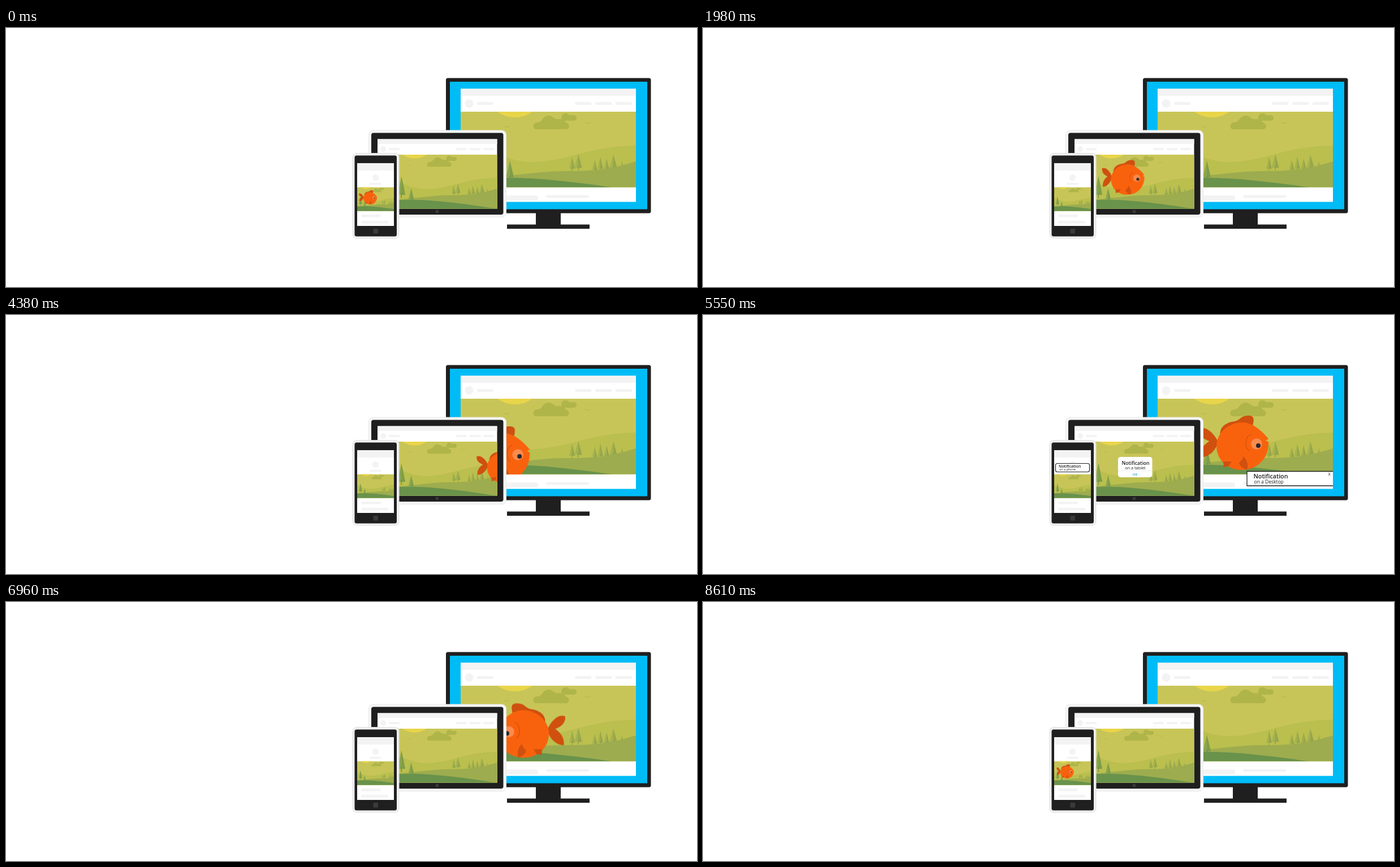
Recreate the animation shown at these times as an HTML page without scripts. Size 1222 px wide and 458 px high, loop 8.64 s.

```html
<!DOCTYPE html>
<html lang="en">
<head>
<meta charset="utf-8">
<title>Fish across devices</title>
<style>
html, body { margin: 0; width: 100%; height: 100%; overflow: hidden; background: #fff; }
svg { display: block; width: 1222px; height: 458px; }
text { font-family: "Open Sans", "Noto Sans", sans-serif; fill: #1f1f1f; }
.bold { font-weight: 600; }
.case { fill: #1f1f1f; }
.pale { fill: #f3f3f3; }
.mark { fill: #3a3a3a; }
.fin { fill: #cf500f; }

.swim, .turn, .tail, .yd, .yt, .note { animation: 8640ms linear infinite; }
.swim { animation-name: swim; }
.turn { animation-name: turn; }
.tail { animation-name: tail; transform-origin: -44px -8px; }
.yd { animation-name: rise-desktop; }
.yt { animation-name: rise-tablet; }
.note { animation-name: note; }

@keyframes swim {
  0% { transform: translateX(644px); }
  2.89% { transform: translateX(640px); }
  4.63% { transform: translateX(642px); }
  6.94% { transform: translateX(656px); }
  10.07% { transform: translateX(683px); }
  12.73% { transform: translateX(708px); }
  16.2% { transform: translateX(732px); }
  20.14% { transform: translateX(745px); }
  22.92% { transform: translateX(751px); }
  30.21% { transform: translateX(763px); }
  34.72% { transform: translateX(769px); }
  40.28% { transform: translateX(761px); }
  42.82% { transform: translateX(774px); }
  45.14% { transform: translateX(805px); }
  47.45% { transform: translateX(842px); }
  50.69% { transform: translateX(880px); }
  55.56% { transform: translateX(932px); }
  60.42% { transform: translateX(949px); }
  64.24% { transform: translateX(954px); }
  75.69% { transform: translateX(958px); }
  78.13% { transform: translateX(951px); }
  80.9% { transform: translateX(909px); }
  83.33% { transform: translateX(818px); }
  85.76% { transform: translateX(718px); }
  87.96% { transform: translateX(668px); }
  90.63% { transform: translateX(645px); }
  94.91% { transform: translateX(640px); }
  100% { transform: translateX(644px); }
}
@keyframes rise-desktop {
  0%, 45% { transform: translateY(258px); }
  50.69% { transform: translateY(251px); }
  60.42% { transform: translateY(237px); }
  64.24% { transform: translateY(232px); }
  70.5%, 75.69% { transform: translateY(229px); }
  77.5% { transform: translateY(227px); }
  80.9% { transform: translateY(234px); }
  83.33%, 100% { transform: translateY(245px); }
}
@keyframes rise-tablet {
  0%, 8% { transform: translateY(290px); }
  10.07% { transform: translateY(285px); }
  15% { transform: translateY(274px); }
  20.14%, 30.2% { transform: translateY(268px); }
  36%, 80% { transform: translateY(270px); }
  85.76% { transform: translateY(275px); }
  90%, 100% { transform: translateY(288px); }
}
@keyframes turn {
  0%, 76.2% { transform: scaleX(1); }
  79.5%, 91.2% { transform: scaleX(-1); }
  94.6%, 100% { transform: scaleX(1); }
}
@keyframes tail {
  0%, 5%, 10%, 15%, 20%, 25%, 32%, 39%, 45%, 50%, 57%, 64%, 71%, 82%, 88%, 100% { transform: scaleX(1); }
  2.5%, 7.5%, 12.5%, 17.5%, 28%, 36%, 42%, 47.5%, 53%, 60%, 67%, 84%, 94% { transform: scaleX(.75); }
  75.69%, 78% { transform: scaleX(.35); }
}
@keyframes note {
  0%, 57.9% { opacity: 0; }
  61.6%, 70.2% { opacity: 1; }
  73.6%, 100% { opacity: 0; }
}
</style>
</head>
<body>
<svg viewBox="0 0 1222 458">
  <defs>
    <g id="pine">
      <path d="M0 0L-5 21H5Z" fill="#a6b24d"/>
      <path d="M0 0V21H5Z" fill="#95a64c"/>
      <path d="M0 18V25" stroke="#8a9c48"/>
    </g>
    <g id="near-pine">
      <path d="M0 0L-7 29H7Z" fill="#8ca64c"/>
      <path d="M0 0V29H7Z" fill="#7d9d4b"/>
      <path d="M0 26V34" stroke="#71904a" stroke-width="1.5"/>
    </g>
    <path id="bird" d="M-5 -1Q-2 -1 0 1Q2 -1 5 -1" fill="none" stroke="#b0b54a"/>

    <g id="scene">
      <path d="M0 0H310V150H0Z" fill="#c8c558"/>
      <circle cx="96" cy="-43" r="53" fill="#e9d54a"/>
      <path d="M132 31C127 29 127 20 134 19C139 19 141 18 144 14C149 6 158 5 164 10C168 14 171 13 176 13C183 13 184 18 188 20C193 22 193 29 188 31Z" fill="#b0b54a"/>
      <path d="M184 16C177 16 177 9 179 7C180 2 189 1 192 6H200C207 6 207 16 200 16Z" fill="#b0b54a"/>
      <use href="#bird" x="82" y="27"/>
      <use href="#bird" x="224" y="20"/>
      <use href="#bird" transform="translate(104 61) scale(.6)"/>
      <path d="M0 48C40 62 85 89 125 89C185 89 230 60 310 60V150H0Z" fill="#babf4e"/>
      <use href="#pine" x="197" y="80"/>
      <use href="#pine" transform="translate(208 75) scale(1.3 1.15)"/>
      <use href="#pine" transform="translate(237 86) scale(.9 .8)"/>
      <use href="#pine" x="247" y="80"/>
      <use href="#pine" transform="translate(258 83) scale(1 .9)"/>
      <use href="#pine" transform="translate(270 76) scale(1.4 1.15)"/>
      <use href="#pine" transform="translate(285 88) scale(.7)"/>
      <path d="M0 118C90 117 130 104 200 105C250 105 280 97 310 88V150H0Z" fill="#9dac4e"/>
      <use href="#near-pine" transform="translate(62 56) scale(1.4 1.65)"/>
      <use href="#near-pine" x="87" y="87"/>
      <path d="M0 122C90 110 170 119 310 140V150H0Z" fill="#69924b"/>
    </g>

    <g id="fish">
      <g class="tail fin">
        <path d="M-43 -8C-49 -20 -64 -37 -79 -31C-80 -20 -72 -13 -59 -9C-70 -2 -78 7 -76 20C-62 20 -47 9 -43 -8Z"/>
      </g>
      <path class="fin" d="M-39 -18C-42 -33 -30 -42 -14 -44C-4 -46 -4 -53 8 -54Q14 -55 18 -52C22 -47 18 -40 18 -32Z"/>
      <path d="M-46 0C-46 -24 -24 -42 0 -42C20 -42 37 -24 46 -13L41 -10L46 -8C47 20 28 42 -2 42C-26 42 -46 24 -46 0Z" fill="#f9620d"/>
      <path class="fin" d="M-34 27L-19 27L-24 35L-33 37Z"/>
      <path class="fin" d="M2 18C8 24 11 33 8 41C1 40 -6 34 -6 29C-3 27 0 23 2 18Z"/>
      <path d="M15 -21C4 -17 3 2 12 8" fill="none" stroke="#d0510f" stroke-width="1.3"/>
      <circle cx="25" cy="-4" r="9.8" fill="#fb8b4e"/>
      <circle cx="28" cy="-1" r="4" fill="#26262a"/>
    </g>

    <clipPath id="clip-d"><path d="M804 148H1114V281.5H804Z"/></clipPath>
    <clipPath id="clip-t"><path d="M657 224H868.5V319.5H657Z"/></clipPath>
    <clipPath id="clip-p"><path d="M621 281.5H686V323.5H621Z"/></clipPath>
  </defs>

  <!-- desktop -->
  <g>
    <path class="case" d="M937 326H981V347.5H1032V355H886V347.5H937Z"/>
    <rect class="case" x="778" y="88.5" width="362.5" height="239" rx="3.5"/>
    <rect x="785" y="95" width="349" height="225.5" fill="#00bcf6"/>
    <rect x="804" y="107.5" width="310" height="200" fill="#fff"/>
    <g class="pale">
      <rect x="804" y="107.5" width="310" height="12.5"/>
      <circle cx="819" cy="133.5" r="7.5"/>
      <rect x="833" y="131" width="29" height="5" rx="2.5"/>
      <rect x="1006" y="131" width="29.5" height="5" rx="2.5"/>
      <rect x="1042" y="131" width="29.5" height="5" rx="2.5"/>
      <rect x="1077.5" y="131" width="29.5" height="5" rx="2.5"/>
      <rect x="860" y="296" width="81.500" height="9" rx="4.5"/>
      <rect x="955" y="295.500" width="76.500" height="5" rx="2.5"/>
    </g>
    <g clip-path="url(#clip-d)">
      <use href="#scene" x="804" y="148"/>
      <g class="swim"><g class="yd"><g class="turn"><use href="#fish"/></g></g></g>
    </g>
    <g class="note">
      <path d="M1114 276.5H962V302H1114" fill="#fff" stroke="#222" stroke-width="1.3"/>
      <text class="bold" x="973.5" y="289" font-size="10.7">Notification</text>
      <text x="974.5" y="298" font-size="8.5">on a Desktop</text>
      <text x="1105.500" y="284" font-size="7.5">X</text>
    </g>
  </g>

  <!-- tablet -->
  <g>
    <rect x="641" y="181" width="243.5" height="154" rx="8" fill="#f6f6f6" stroke="#ebebeb"/>
    <rect class="case" x="646" y="185.500" width="233.5" height="144.5" rx="4"/>
    <rect x="657" y="196.500" width="211.5" height="123" fill="#fff"/>
    <rect class="mark" x="760" y="322" width="5" height="5"/>
    <g class="pale">
      <rect x="657" y="196.500" width="211.5" height="8.5"/>
      <circle cx="667" cy="214" r="5"/>
      <rect x="676.500" y="212.300" width="20" height="3.6" rx="1.8"/>
      <rect x="795.500" y="212.300" width="20" height="3.6" rx="1.8"/>
      <rect x="819.500" y="212.300" width="20" height="3.6" rx="1.8"/>
      <rect x="843.500" y="212.300" width="20" height="3.6" rx="1.8"/>
    </g>
    <g clip-path="url(#clip-t)">
      <use href="#scene" transform="translate(657 224) scale(.683)"/>
      <g class="swim"><g class="yt"><g class="turn"><use href="#fish" transform="scale(.64)"/></g></g></g>
    </g>
    <g class="note">
      <rect x="734" y="251" width="60.500" height="36" rx="4.5" fill="#fff"/>
      <path d="M734 275.500H794.500" stroke="#e4e4e4" stroke-width=".8"/>
      <g text-anchor="middle">
        <text class="bold" x="765" y="265" font-size="8.600">Notification</text>
        <text x="764.500" y="273" font-size="7.300">on a tablet</text>
        <text class="bold" x="764" y="284" font-size="5.800" style="fill:#1d9cc4">OK</text>
      </g>
    </g>
  </g>

  <!-- phone -->
  <g>
    <rect x="613" y="221.500" width="82" height="150.500" rx="7" fill="#efefef" stroke="#e2e2e2"/>
    <rect class="case" x="616.500" y="225.500" width="74.500" height="143" rx="3.5"/>
    <rect x="621" y="239" width="65" height="111" fill="#fff"/>
    <rect class="mark" x="649.500" y="355" width="8.500" height="8.500"/>
    <g class="pale">
      <rect x="621" y="239" width="65" height="13"/>
      <circle cx="653.500" cy="264.500" r="5.500"/>
      <rect x="643" y="273.800" width="21" height="3.400" rx="1.7"/>
      <rect x="628" y="330" width="35" height="4.500" rx="2.2"/>
      <rect x="628" y="341" width="48.500" height="4.500" rx="2.2"/>
    </g>
    <g clip-path="url(#clip-p)">
      <use href="#scene" transform="translate(608.8 281.5) scale(.29)"/>
      <g class="swim"><g class="turn"><use href="#fish" transform="translate(0 301) scale(.26)"/></g></g>
    </g>
    <g class="note">
      <rect x="623.500" y="262.500" width="60" height="15" rx="3" fill="#fff" stroke="#222" stroke-width="1.2"/>
      <text class="bold" x="629" y="270" font-size="6.900">Notification</text>
      <text x="630" y="275.300" font-size="5.500">on a phone</text>
    </g>
  </g>
</svg>
</body>
</html>
```
